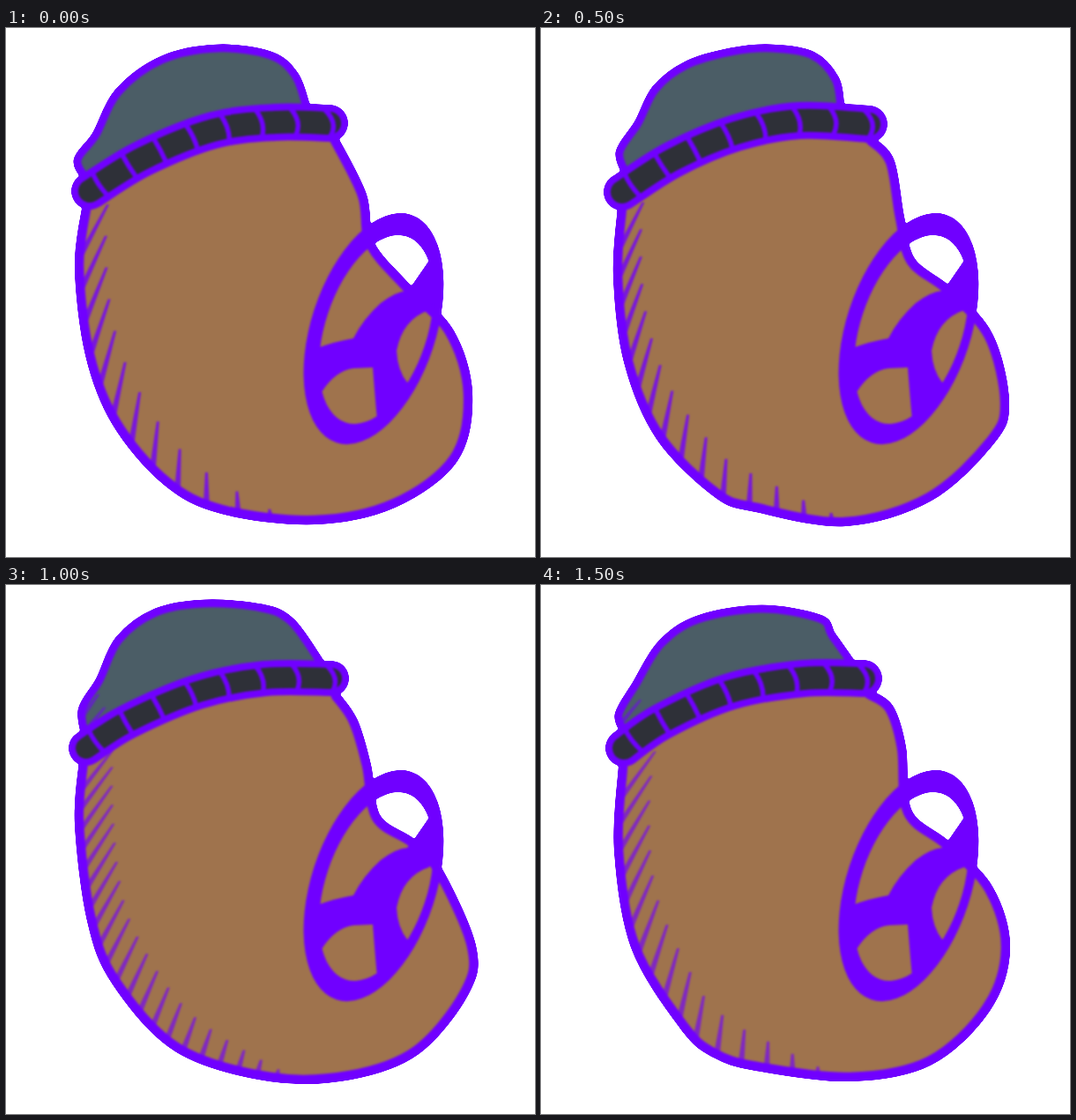
Recreate the animation shown at these times as an HTML page. Size 600 by 600 pixels, loop 2000 ms.

```html
<!DOCTYPE html>
<html lang="en">
<head>
<meta charset="utf-8">
<title>Bean driver</title>
<style>
  html, body { margin: 0; width: 100%; height: 100%; overflow: hidden; background: #fff; }
  svg { display: block; width: 100vw; height: 100vh; }
  path { stroke-linejoin: round; stroke-linecap: round; }
  .line { fill: none; stroke: #7000ff; }
  .ink { fill: #7000ff; }
  .pose { visibility: hidden; animation: show 2s step-end infinite; }
  @keyframes show {
    0% { visibility: visible; }
    25%, 100% { visibility: hidden; }
  }
</style>
</head>
<body>
<svg viewBox="0 0 600 600">
  <defs>
    <!-- Soft inside, hard silhouette -->
    <filter id="felt" filterUnits="userSpaceOnUse" x="0" y="0" width="600" height="600"
            color-interpolation-filters="sRGB">
      <feGaussianBlur stdDeviation="1.3"/>
      <feComponentTransfer><feFuncA type="linear" slope="6" intercept="-2.5"/></feComponentTransfer>
    </filter>
    <mask id="hole" maskUnits="userSpaceOnUse" x="0" y="0" width="600" height="600">
      <rect width="600" height="600" fill="#fff"/>
      <ellipse rx="57.8" ry="111" transform="translate(420 342) rotate(18.2)"/>
    </mask>
  </defs>
  <g filter="url(#felt)">
    <g id="poses"></g>
    <g class="ink">
      <g mask="url(#hole)">
        <ellipse rx="70.8" ry="136" transform="translate(417 341) rotate(18.1)"/>
      </g>
      <path d="M350 364Q375 355 394 352Q405 330 425 312Q442 299 455 298L461 291L481 262L492 300
               L480 320Q450 330 443 366Q444 388 455 402L464 398L440 440L421 445Q418 412 416 385
               L394 386Q373 389 358 413L345 400Z"/>
    </g>
  </g>
</svg>
<script>
const SKIN = '#9f734d', WOOL = '#4b5d66', BAND = '#2e3038', RIBS = 8;
const stage = document.getElementById('poses');

function add(parent, tag, attrs) {
  const el = document.createElementNS('http://www.w3.org/2000/svg', tag);
  for (const key in attrs) el.setAttribute(key, attrs[key]);
  return parent.appendChild(el);
}

// Catmull-Rom spline through "x,y x,y ..."
function curve(text) {
  const p = text.trim().split(/\s+/).map(s => s.split(',').map(Number));
  const at = i => p[Math.max(0, Math.min(p.length - 1, i))];
  let d = 'M' + p[0];
  for (let i = 0; i < p.length - 1; i++) {
    const [a, b, c, e] = [at(i - 1), at(i), at(i + 1), at(i + 2)];
    const c1 = b.map((v, k) => v + (c[k] - a[k]) / 6);
    const c2 = c.map((v, k) => v - (e[k] - b[k]) / 6);
    d += `C${c1} ${c2} ${c}`;
  }
  return d;
}

// Tapered strokes rooted along a path, shrinking and straightening towards its end
function hatch(g, path, { n, from, to, len, lean, ink }) {
  let d = '';
  for (let i = 0; i < n; i++) {
    const k = i / (n - 1);
    const { x, y } = path.getPointAtLength(from + (to - from) * k);
    const turn = (lean[0] + (lean[1] - lean[0]) * k) * Math.PI / 180;
    const size = 10 + len * (1 - k ** 3);
    const u = x + Math.sin(turn) * size, v = y - Math.cos(turn) * size;
    d += `M${x - 3.5} ${y}L${u - 1.5} ${v}h3L${x + 3.5} ${y}Z`;
  }
  add(g, 'path', { d, class: 'ink', opacity: ink });
}

function drawBand(g, d, width) {
  add(g, 'path', { d, class: 'line', 'stroke-width': width });
  const spine = add(g, 'path', { d, fill: 'none', stroke: BAND, 'stroke-width': width - 16 });
  const total = spine.getTotalLength();
  let ribs = '';
  for (let i = 0; i < RIBS; i++) {
    const s = 14 + (total - 16) * i / (RIBS - 1);
    const p = spine.getPointAtLength(s), q = spine.getPointAtLength(s - 2);
    const dx = (p.x - q.x) / 2 * 15, dy = (p.y - q.y) / 2 * 15;
    const lean = i * .5, bow = (i - 1.5) * 2.2;
    ribs += `M${p.x + dy - lean} ${p.y - dx}Q${p.x + bow} ${p.y} ${p.x - dy + lean} ${p.y + dx}`;
  }
  add(g, 'path', { d: ribs, class: 'line', 'stroke-width': 5.5 });
}

function pose(index, { body, dome, band, width = 42, marks, shade }) {
  const g = add(stage, 'g', { class: 'pose', style: `animation-delay:${index * .5 - 2}s` });
  const bodyLine = curve(body), domeLine = curve(dome);
  add(g, 'path', { d: bodyLine + 'L300 108L120 165Z', fill: SKIN });
  hatch(g, add(g, 'path', { d: bodyLine, class: 'line', 'stroke-width': 10.5 }), marks);
  add(g, 'path', { d: domeLine, fill: WOOL });
  const edge = add(g, 'path', { d: domeLine, class: 'line', 'stroke-width': 9 });
  if (shade) hatch(g, edge, { n: 3, from: 12, to: 45, len: 26, lean: [40, 32], ink: .6 });
  drawBand(g, curve(band), width);
}

[{
  body: `92,200 83,270 95,370 125,447 182,514 245,546 350,558 440,539 508,488 524,415
    503,345 453,293 413,245 404,190 372,126`,
  dome: '92,172 81,150 102,121 127,73 177,36 240,23 300,31 328,54 341,90',
  band: '95,185 155,148 235,116 305,107 367,108',
  marks: { n: 12, from: 62, to: 470, len: 59, lean: [28, -6], ink: .8 }
}, {
  body: `92,204 87,280 99,378 135,463 200,528 245,544 345,560 440,532 510,468 526,425
    508,350 462,298 420,265 407,215 396,152 374,128`,
  dome: '98,168 89,141 110,108 130,69 165,42 215,27 262,23 308,31 334,58 340,90',
  band: '92,186 150,149 221,119 293,105 372,109',
  marks: { n: 15, from: 50, to: 495, len: 53, lean: [27, -4], ink: .8 }
}, {
  body: `88,200 83,270 97,380 125,450 195,525 300,558 390,556 465,528 520,462 528,410
    489,322 460,292 420,264 409,205 394,155 374,126`,
  dome: '92,178 86,142 106,108 128,62 170,31 225,21 290,26 324,42 358,90',
  band: '91,185 138,155 218,121 294,106 369,106',
  width: 40,
  marks: { n: 21, from: 35, to: 478, len: 53, lean: [38, 14], ink: .65 },
  shade: true
}, {
  body: `93,206 88,300 107,410 162,500 197,531 245,546 350,558 440,540 505,480 527,412
    508,345 460,295 416,258 409,185 395,140 372,124`,
  dome: '96,168 88,147 108,112 136,67 178,39 250,27 316,38 330,57 352,88',
  band: '94,185 137,155 214,121 298,106 366,106',
  marks: { n: 16, from: 38, to: 480, len: 58, lean: [36, -2], ink: .65 },
  shade: true
}].forEach((look, i) => pose(i, look));
</script>
</body>
</html>
```
